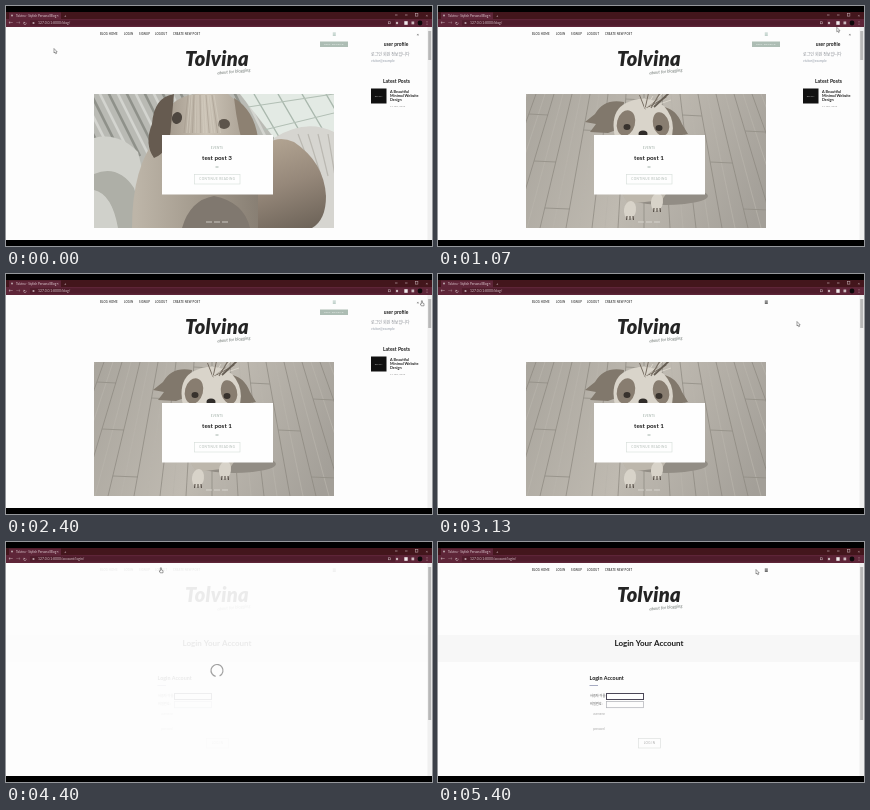
An HTML page with a canvas that plays this animation: 426x240 px, repeating every 5470 ms.

```html
<!DOCTYPE html>
<html lang="en">
<head>
<meta charset="utf-8">
<title>Blog walkthrough</title>
<style>
html, body { margin: 0; width: 100%; height: 100%; overflow: hidden; background: #000; }
canvas { display: block; width: 100vw; height: 100vh; }
</style>
</head>
<body>
<canvas id="stage" width="426" height="240"></canvas>
<script>
const ctx = document.getElementById('stage').getContext('2d');
const LOOP = 5470, FPS = 15;
const SANS = 'Lato, sans-serif';
const KOREAN = '"Noto Sans CJK KR", "Noto Sans CJK", sans-serif';
const BRAND = 'Tolvina';
const INK = '#1c1c1c';
const PAGE = { top: 21, height: 213 };

// time, x, y of the pointer
const POINTER = [
  [0, 49, 45], [600, 382, 7], [1100, 400, 24], [1530, 408, 31], [2400, 416, 29],
  [2600, 414, 29], [3130, 360, 50], [4070, 155, 28], [4400, 155, 28], [5400, 319, 30], [5470, 322, 29]
];
const SLIDE = { start: 395, length: 500, step: 246 };
const PANEL = { start: 2500, length: 400, width: 112 };
const LOGIN_AT = 4250, REVEAL_AT = 4330, REVEAL_LENGTH = 400;

const clamp = v => Math.max(0, Math.min(1, v));
const smooth = v => v * v * (3 - 2 * v);

// CSS "ease" curve, solved by bisection
function ease(v) {
  const bezier = (a, b, u) => 3 * a * u * (1 - u) ** 2 + 3 * b * u * u * (1 - u) + u ** 3;
  let low = 0, high = 1;
  for (let i = 0; i < 20; i++) {
    const mid = (low + high) / 2;
    if (bezier(.25, .25, mid) < v) low = mid; else high = mid;
  }
  return bezier(.1, 1, low);
}

const progress = (t, part) => ease(clamp((t - part.start) / part.length));

function rect(x, y, w, h, color) {
  ctx.fillStyle = color;
  ctx.fillRect(x, y, w, h);
}

function frame(x, y, w, h, color, width = .6) {
  ctx.strokeStyle = color;
  ctx.lineWidth = width;
  ctx.strokeRect(x, y, w, h);
}

function oval(x, y, rx, ry, color, turn = 0) {
  ctx.fillStyle = color;
  ctx.beginPath();
  ctx.ellipse(x, y, rx, ry, turn, 0, Math.PI * 2);
  ctx.fill();
}

function line(x1, y1, x2, y2, color, width = .6) {
  ctx.strokeStyle = color;
  ctx.lineWidth = width;
  ctx.beginPath();
  ctx.moveTo(x1, y1);
  ctx.lineTo(x2, y2);
  ctx.stroke();
}

function shape(path, color) {
  ctx.fillStyle = color;
  ctx.fill(new Path2D(path));
}

// evenly spaced colours along a line
function gradient(x1, y1, x2, y2, ...colors) {
  const fill = ctx.createLinearGradient(x1, y1, x2, y2);
  colors.forEach((color, i) => fill.addColorStop(i / (colors.length - 1), color));
  return fill;
}

function text(str, x, y, size, color, { weight = 400, align = 'left', family = SANS, spacing = 0 } = {}) {
  ctx.font = `${weight} ${size}px ${family}`;
  ctx.letterSpacing = spacing + 'px';
  ctx.textAlign = align;
  ctx.fillStyle = color;
  ctx.fillText(str, x, y);
}

function clipped(x, y, w, h, draw) {
  ctx.save();
  ctx.beginPath();
  ctx.rect(x, y, w, h);
  ctx.clip();
  draw();
  ctx.restore();
}

function browser(onLogin) {
  rect(0, 6, 426, 8, '#43161c');
  rect(3, 6.5, 52, 7.5, '#5e2538');
  rect(0, 13, 426, 8, '#5e2538');
  oval(6, 9.5, 1, 1, '#b9a5aa');
  text(BRAND + ' - Stylish Personal Blog', 10, 10.8, 3.1, '#dccbd0');
  text('×', 50.5, 10.8, 4, '#dccbd0');
  text('+', 58, 10.8, 4, '#dccbd0');
  line(389, 9, 391.5, 9, '#c9b5ba');
  line(399, 9, 401.5, 9, '#c9b5ba');
  frame(409.5, 7.7, 2.4, 2.4, '#c9b5ba', .5);
  text('×', 419.5, 10.6, 4.5, '#c9b5ba');

  text('←', 2.5, 18.4, 4.5, '#e6d9dc');
  text('→', 10, 18.4, 4.5, '#a98c94');
  text('↻', 17, 18.6, 4.5, '#e6d9dc', { family: '"DejaVu Sans", sans-serif' });
  rect(24, 14.2, 365, 5.4, '#4f1c2b');
  oval(27.5, 17, 1.1, 1.1, '#b9a0a7');
  text(onLogin ? '127.0.0.1:8000/account/login/' : '127.0.0.1:8000/blog/', 32, 18.3, 3.4, '#d6c3c9');
  frame(382.5, 15.8, 2, 2, '#c9b5ba', .5);
  oval(391, 17, 1.2, 1.2, '#c9b5ba');
  rect(398.3, 15.2, 3.4, 3.6, '#f0e9eb');
  rect(405.5, 15.5, 2.7, 2.8, '#cbb8bd');
  oval(414, 17, 2.4, 2.4, '#0d090a');
  for (let i = 0; i < 3; i++) oval(421, 15.4 + i * 1.5, .4, .4, '#e6d9dc');
}

function scrollbar(thumb) {
  rect(421.5, PAGE.top, 4.5, PAGE.height, '#f0f0f0');
  rect(422.2, 25, 3, thumb, '#b8b8b8');
}

function header(panelOpen) {
  const nav = { weight: 700, spacing: .18 };
  [['BLOG HOME', 94], ['LOGIN', 118], ['SIGNUP', 133], ['LOGOUT', 149], ['CREATE NEW POST', 167]]
    .forEach(([label, x]) => text(label, x, 29.2, 2.7, '#444', nav));
  const icon = panelOpen ? '#a9c0b8' : '#333';
  for (let i = 0; i < 3; i++) line(326.8, 27 + i * 1.2, 329.8, 27 + i * 1.2, icon, .8);

  text(BRAND, 211, 60, 20, '#242424', { weight: 'italic 900', align: 'center', spacing: .3 });
  ctx.save();
  ctx.translate(211.5, 68.5);
  ctx.rotate(-.1);
  text('about for blogging', 0, 0, 4.4, '#6f7773', { weight: 'italic 400' });
  ctx.restore();
}

function facePhoto() {
  // curtain folds and bright window panes
  rect(88, 88, 240, 134, '#b9bab4');
  for (let i = 0; i < 22; i++) {
    const x = 66 + i * 9;
    line(x, 86, x + 32, 150, i % 2 ? '#d3d4cf' : '#8f918a', 2.6);
  }
  shape('M234 88H328V150H282Z', '#e3eae4');
  for (let i = 0; i < 4; i++) line(248 + i * 24, 88, 276 + i * 24, 136, '#a9b8ad', 1.4);
  line(242, 101, 328, 88, '#b3c0b6', 1.2);
  line(258, 124, 328, 107, '#b3c0b6', 1.2);

  // bedding
  shape('M88 132Q112 126 132 146L150 222H88Z', '#d0d1cb');
  shape('M88 168Q112 158 128 182L140 222H112Q106 188 88 184Z', '#aeafa7');
  shape('M268 132Q300 112 328 126V222H262Z', '#d6d5d0');
  for (let i = 0; i < 4; i++) line(292 + i * 10, 128, 308 + i * 7, 170, '#bab8b1', 1.2);

  // body and the near arm
  shape('M126 222Q126 160 152 130L240 122Q264 150 274 222Z', gradient(130, 0, 270, 0, '#bdb5a8', '#a0978a', '#80776c'));
  shape('M252 222V148Q266 126 288 136Q318 156 320 190Q320 214 306 222Z',
    gradient(270, 130, 300, 222, '#b3a593', '#96887a', '#6f655a'));
  shape('M176 222Q184 194 208 190Q238 196 244 222Z', '#80786f');

  // head
  shape('M158 138Q152 92 190 88H222Q246 106 242 140Z', gradient(160, 0, 240, 0, '#a2988b', '#cbc3b6', '#aaa194'));
  shape('M168 88Q148 91 146 118Q138 138 148 152Q164 146 165 120Z', '#665b50');
  shape('M228 92Q248 104 252 132Q250 148 240 148Q232 126 228 92Z', '#8d8172');
  oval(171, 112, 5, 6, '#4d463f', .3);
  oval(218, 118, 6, 5, '#5c544b');
  for (let i = 0; i < 14; i++) line(182 + i * 2, 89, 178 + i * 2.8, 127, i % 3 ? '#d5cec2' : '#a59b8e', .6);
}

function floorPhoto() {
  rect(88, 88, 240, 134, gradient(88, 88, 328, 190, '#a9a59d', '#bfbab1', '#a39f98'));
  for (let i = -9; i < 10; i++) {
    const top = 206 + i * 18, bottom = 206 + i * 26;
    line(top, 88, bottom, 222, '#8b877f', .7);
    line(top + 9, 88, bottom + 13, 222, '#b9b5ac', .7);
    const joint = 92 + ((i + 9) * 47) % 125, k = (joint - 88) / 134;
    line(top + (bottom - top) * k, joint, top + 18 + (bottom - top + 8) * k, joint + 1, '#928e86', .8);
  }
  // shadow, chest and front paws
  oval(228, 190, 42, 9, '#928d85');
  shape('M184 188H228L224 194L190 198Z', '#bdb7ac');
  for (const [x, y] of [[192, 204], [219, 196]]) {
    oval(x, y, 6, 9, '#d8d3c9', .15);
    for (let i = -1; i < 2; i++) line(x + i * 3, y + 6, x + i * 3.4, y + 10, '#494039', 1);
  }
  // fluffy ears and head
  shape('M186 96Q166 92 157 108L147 116L158 118L152 126L170 127L184 122Z', '#81786c');
  shape('M222 100Q238 102 244 118L250 128L232 131L224 122Z', '#81786c');
  shape('M178 136Q170 106 188 97Q208 87 226 100Q240 116 232 136Z', '#d9d4ca');
  oval(188, 117, 9, 13, '#887d70', .25);
  oval(223, 118, 8, 12, '#887d70', -.25);
  for (let i = 0; i < 9; i++) {
    line(207, 103, 197 + i * 4.5, 94 - (i * 5) % 8, i % 2 ? '#776e63' : '#d9d4ca', 1);
  }
  line(216, 101, 231, 87, '#665e54', 1.8);
  line(213, 102, 222, 87, '#776e63', 1.2);
  oval(189, 121, 3.5, 3, '#38322d');
  oval(221, 122, 3.5, 3, '#38322d');
  oval(205, 128, 4.5, 3.5, '#302c29');
}

function slide(title, photo, shift) {
  ctx.save();
  ctx.translate(shift, 0);
  clipped(88, 88, 240, 134.5, photo);
  rect(156, 129, 111, 59.5, '#fefefe');
  text('EVENTS', 211, 143.3, 2.9, '#9caba3', { align: 'center', spacing: .25 });
  text(title, 211, 154, 6.3, INK, { weight: 700, align: 'center' });
  line(209.5, 161, 212.5, 161, '#a4b3ab', 1);
  frame(188.5, 168.5, 45.5, 9.5, '#d4dcd8');
  text('CONTINUE READING', 211.3, 174.4, 3.1, '#b1bbb6', { align: 'center', spacing: .35 });
  ctx.restore();
}

function sidePanel(shift) {
  ctx.save();
  ctx.translate(shift, 0);
  rect(342, PAGE.top, 80, PAGE.height, '#fdfdfd');
  rect(314, 35.5, 28, 5.5, '#adbdb4');
  text('EDIT PROFILE', 328, 39.3, 2.6, '#edf2ef', { align: 'center', spacing: .25 });
  text('×', 410.5, 29.8, 4.5, '#333');
  text('user profile', 390, 40, 4.9, INK, { weight: 700, align: 'center' });
  text('로그인 회원 정보입니다', 365, 50.2, 4, '#8a8e94', { family: KOREAN });
  text('visitor@example', 365, 55.5, 3.3, '#969eaa');
  text('Latest Posts', 390.5, 77, 5, INK, { weight: 700, align: 'center' });
  rect(365, 82.5, 15.5, 15, '#111');
  text('BEAUTY', 372.7, 90.7, 2, '#b5b5b5', { align: 'center' });
  ['A Beautiful', 'Minimal Website', 'Design'].forEach((row, i) =>
    text(row, 384, 86.5 + i * 4.3, 3.8, INK, { weight: 700 }));
  text('17 July, 2019', 384, 100.7, 2.6, '#8c8c8c');
  ctx.restore();
}

function homePage(t) {
  const closing = progress(t, PANEL);
  header(closing < .5);
  const moved = SLIDE.step * progress(t, SLIDE);
  clipped(88, 88, 246, 134.5, () => {
    slide('test post 3', facePhoto, -moved);
    slide('test post 1', floorPhoto, SLIDE.step - moved);
  });
  for (let i = 0; i < 3; i++) line(200 + i * 8, 216, 206 + i * 8, 216, '#dedbd5', .8);
  if (closing < 1) sidePanel(PANEL.width * closing);
  scrollbar(29);
}

function loginPage() {
  header(false);
  rect(0, 93, 421.5, 27, '#f7f7f7');
  text('Login Your Account', 211, 104.3, 8, INK, { weight: 700, align: 'center' });
  text('Login Account', 151.5, 138.3, 5.4, INK, { weight: 700 });
  line(151.5, 143.5, 160, 143.5, '#9da2bb', .9);
  text('사용자 이름:', 152, 155.4, 3.2, '#555', { family: KOREAN });
  text('비밀번호:', 152, 163.4, 3.2, '#555', { family: KOREAN });
  rect(168, 151, 38, 7, '#fff');
  frame(168.5, 151.5, 37, 6, '#4c4858', 1);
  frame(168.5, 159.5, 37, 6.2, '#aeb0b5', .7);
  text('username', 155, 172.8, 2.8, '#aaa');
  text('password', 155, 187.8, 2.8, '#aaa');
  frame(200.5, 196.5, 22, 9.5, '#d9dcda');
  text('LOG IN', 211.5, 202.3, 3, '#aaa', { align: 'center', spacing: .25 });
}

function preloader(t) {
  const cover = 1 - smooth(clamp((t - REVEAL_AT) / REVEAL_LENGTH));
  if (!cover) return;
  ctx.globalAlpha = cover;
  rect(0, PAGE.top, 421.5, PAGE.height, '#fdfdfd');
  ctx.strokeStyle = '#999';
  ctx.lineWidth = 1.2;
  ctx.beginPath();
  const turn = (t - 4400) / 1000 * Math.PI * 2 + 1.8;
  ctx.arc(211, 128.5, 6, turn, turn + 5.6);
  ctx.stroke();
  ctx.globalAlpha = 1;
}

function pointer(t) {
  const next = POINTER.findIndex(key => key[0] > t);
  const [t0, x0, y0] = POINTER[next - 1], [t1, x1, y1] = POINTER[next];
  const k = smooth((t - t0) / (t1 - t0));
  ctx.save();
  ctx.translate(x0 + (x1 - x0) * k, y0 + (y1 - y0) * k);
  const hand = (t > 1900 && t < 2600) || (t > 3950 && t < 4500);
  const path = new Path2D(hand
    ? 'M-.6 -2.2H.4V0L2 .5V2.8H-.8L-1.8 .9H-.6Z'
    : 'M-1 -2.5V2L0 1.2L.8 2.8L1.5 2.4L.9 .9H2.2Z');
  ctx.fillStyle = '#fff';
  ctx.strokeStyle = '#444';
  ctx.lineWidth = .5;
  ctx.fill(path);
  ctx.stroke(path);
  ctx.restore();
}

function draw(now) {
  const t = Math.floor(((now % LOOP) + 5) * FPS / 1000) * 1000 / FPS % LOOP;
  const onLogin = t >= LOGIN_AT;
  rect(0, 0, 426, 240, '#000');
  browser(onLogin);
  clipped(0, PAGE.top, 426, PAGE.height, () => {
    rect(0, PAGE.top, 426, PAGE.height, '#fdfdfd');
    if (onLogin) {
      loginPage();
      preloader(t);
      scrollbar(153);
    } else {
      homePage(t);
    }
  });
  pointer(t);
}

function tick() {
  draw(performance.now());
  requestAnimationFrame(tick);
}
tick();
</script>
</body>
</html>
```
